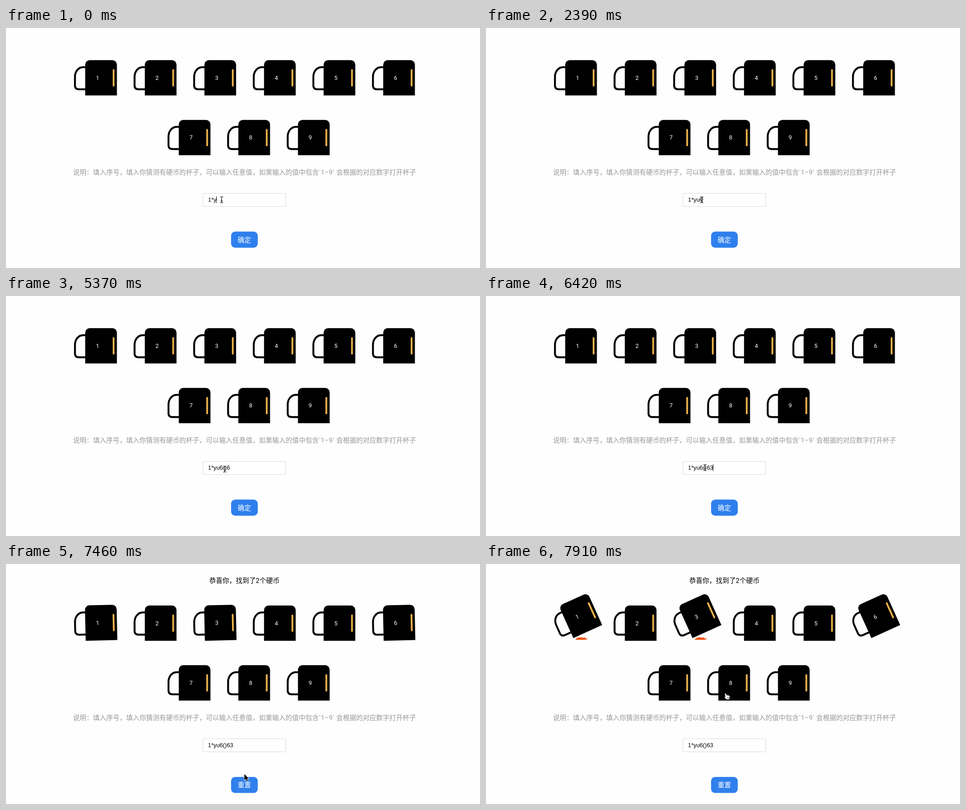
Write an HTML page with a canvas that moves like this. It is 1053 px wide and 532 px high and loops after 8 s.

```html
<!DOCTYPE html>
<html lang="zh">
<head>
<meta charset="utf-8">
<title>猜硬币</title>
<style>
html, body { margin: 0; width: 100%; height: 100%; overflow: hidden; background: #fefefe; }
canvas { display: block; width: 1053px; height: 532px; }
</style>
</head>
<body>
<canvas id="stage"></canvas>
<script>
const W = 1053, H = 532, LOOP = 8000;
const PITCH = 132.4, SHIFT = 20.65;
const REVEAL = 7460, TILT_START = 7400, TILT_TIME = 1000, TILT_END = 30;
const CJK = '"Noto Sans CJK SC", "Noto Sans CJK", sans-serif';
const BODY = '14.75px Roboto, ' + CJK;
const DIGIT = '12.9px Roboto, ' + CJK;
const INPUT = '12.95px "Liberation Sans", ' + CJK;

const canvas = document.getElementById('stage');
const ctx = canvas.getContext('2d');
const dpr = window.devicePixelRatio || 1;
canvas.width = W * dpr;
canvas.height = H * dpr;

// [time, number of typed characters, caret visible]
const FULL_TEXT = '1*yu6()63';
const TYPING = [
  [0, 3, 1], [450, 4, 1], [890, 4, 0], [1340, 5, 1], [1790, 5, 0], [2390, 5, 1],
  [2830, 5, 0], [3280, 5, 1], [3430, 6, 1], [3580, 7, 1], [4030, 7, 0], [4630, 7, 1],
  [4930, 8, 1], [5370, 8, 0], [5970, 8, 1], [6420, 9, 1], [6870, 9, 0]
];

// [time, cursor shape, x, y]
const POINTER = [
  [0, beam, 479, 380.5], [5370, beam, 486, 383.5], [5520, beam, 486.5, 381.5],
  [5670, beam, 486.5, 380], [6720, beam, 490, 386], [6870, arrow, 506, 418],
  [7010, arrow, 524, 455], [7160, arrow, 529.5, 465.5], [7610, arrow, 533, 340],
  [7760, hand, 535.6, 293]
];

const at = (track, t) => track.filter(key => key[0] <= t).pop();

// CSS "ease" timing: cubic-bezier(.25, .1, .25, 1)
function ease(x) {
  const curve = (s, a, b) => 3 * (1 - s) ** 2 * s * a + 3 * (1 - s) * s * s * b + s ** 3;
  let lo = 0, hi = 1;
  for (let i = 0; i < 24; i++) {
    const mid = (lo + hi) / 2;
    if (curve(mid, .25, .25) < x) lo = mid; else hi = mid;
  }
  return curve(lo, .1, 1);
}

function label(text, x, y, font, color, align = 'center') {
  ctx.font = font;
  ctx.fillStyle = color;
  ctx.textAlign = align;
  ctx.fillText(text, x, y);
}

function box(x, y, w, h, r, color) {
  ctx.beginPath();
  ctx.roundRect(x, y, w, h, r);
  ctx.fillStyle = color;
  ctx.fill();
}

function path(d, fill, stroke, width) {
  const p = new Path2D(d);
  if (stroke) {
    ctx.strokeStyle = stroke;
    ctx.lineWidth = width;
    ctx.stroke(p);
  }
  if (fill) {
    ctx.fillStyle = fill;
    ctx.fill(p);
  }
}

function coin() {
  path('M24 75.2 L31 71.5 L27 74.8 L37 71 L33 75.3 L43 71.5 L40 75.3 L48.5 73.8 M28 72.3 L44 73.3 M26 75 H45', null, '#f0500f', 1.9);
}

function mug(n, tilt) {
  const second = n > 6;
  const x = second ? 383.8 + (n - 7) * PITCH : 176 + (n - 1) * PITCH;
  ctx.save();
  ctx.translate(x, 71.3 + (second ? PITCH : 0));
  if (tilt && n !== 6) coin();
  ctx.translate(-5, 33.6);
  ctx.rotate(-tilt * Math.PI / 180);
  ctx.translate(5, -33.6);
  path('M2 15.5 H-5 C-15 15.7 -22.8 25 -22.8 37 V56 Q-22.8 64.6 -14 64.6 H2', null, '#000', 4.2);
  box(0, 0, 70.4, 78.3, [10, 10, 0, 0], '#000');
  box(61, 20, 4, 38.5, 2, '#e9b149');
  label(n, 27.3, 43.6, DIGIT, '#fff');
  ctx.restore();
}

function field(t) {
  const [, count, caret] = at(TYPING, t);
  const text = FULL_TEXT.slice(0, count);
  ctx.strokeStyle = '#d8d8d8';
  ctx.lineWidth = 1;
  ctx.beginPath();
  ctx.roundRect(437.6, 366.6, 184, 29, 1);
  ctx.fillStyle = '#fff';
  ctx.fill();
  ctx.stroke();
  label(text, 448.7, 385.4, INPUT, '#000', 'left');
  if (caret) {
    ctx.fillStyle = '#000';
    ctx.fillRect(Math.floor(448.7 + ctx.measureText(text).width), 373, 1, 15);
  }
}

function beam() {
  const d = 'M-3 -6.5 Q0 -6.5 0 -4 Q0 -6.5 3 -6.5 M0 -4 V4.5 M-3 7 Q0 7 0 4.5 Q0 7 3 7 M-2 2.5 H2';
  path(d, null, '#fff', 2.4);
  path(d, null, '#000', 1.2);
}

function arrow() {
  path('M0 0 V14 L3.2 11 L5.5 16 L7.7 15 L5.5 10.3 H10 Z', '#000', '#fff', 1.8);
}

function hand() {
  path('M-4.8 -5.8 Q-3.4 -7 -2.5 -5.3 L-.7 -1.6 Q.6 -3 1.5 -1.5 Q3 -2.6 3.7 -1.1 Q5.5 -1.6 5.7 .5 ' +
       'L5.5 3.5 L4.4 7.3 H-1.2 L-4.6 3.2 Q-6.3 1 -4.6 .7 L-2.8 1.8 L-5 -4 Z', '#fff', '#000', 1.6);
  path('M.5 2.5 V5 M2.2 2.5 V5 M3.8 2.5 V5', null, '#000', .6);
}

function draw(t) {
  const open = t >= REVEAL;
  // The tilt advances in 150 ms steps.
  const step = REVEAL + Math.min(3, Math.floor((t - REVEAL) / 150)) * 150;
  const tilt = open ? TILT_END * ease((step - TILT_START) / TILT_TIME) : 0;

  ctx.setTransform(dpr, 0, 0, dpr, 0, 0);
  ctx.fillStyle = '#fefefe';
  ctx.fillRect(0, 0, W, H);
  ctx.lineJoin = ctx.lineCap = 'round';

  ctx.save();
  if (open) {
    label('恭喜你，找到了2个硬币', 529.5, 41.6, BODY, '#000');
    ctx.translate(0, SHIFT);
  }
  for (let n = 1; n <= 9; n++) mug(n, [1, 3, 6].includes(n) ? tilt : 0);
  label('说明：填入序号，填入你猜测有硬币的杯子，可以输入任意值，如果输入的值中包含`1–9` 会根据的对应数字打开杯子',
        148.9, 325, BODY, '#999', 'left');
  field(t);
  box(500, 451.3, 59.3, 35.6, 9, '#2f80ed');
  label(open ? '重置' : '确定', 529.6, 474.7, BODY, '#fff');
  ctx.restore();

  const [, shape, x, y] = at(POINTER, t);
  ctx.translate(x, y);
  shape();
}

const start = performance.now();
function tick() {
  draw((performance.now() - start) % LOOP);
  requestAnimationFrame(tick);
}
tick();
</script>
</body>
</html>
```
